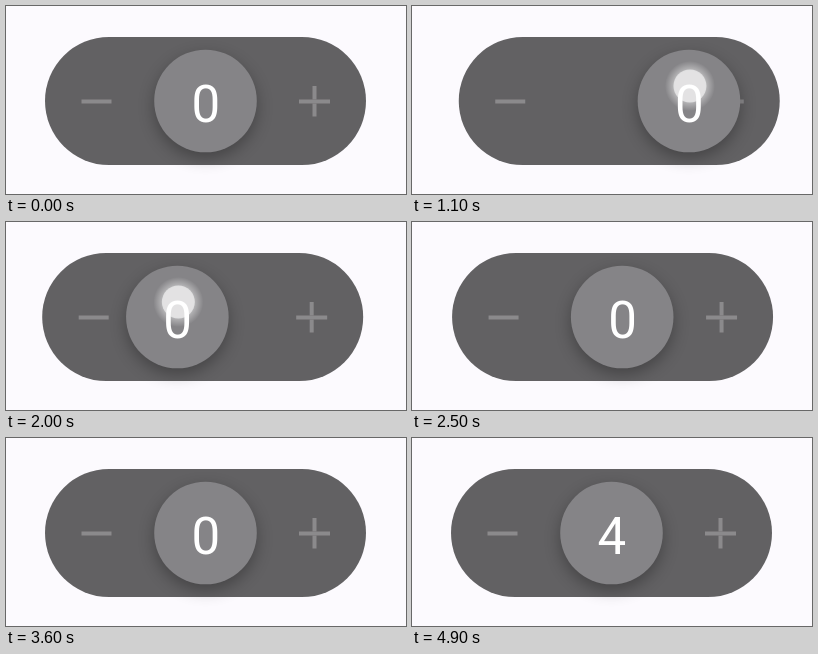
Recreate the animation shown at these times as an HTML page with a canvas. Size 400 px wide and 188 px high, loop 5000 ms.

```html
<!DOCTYPE html>
<html lang="en">
<head>
<meta charset="utf-8">
<title>Stepper</title>
<style>
  html, body { margin: 0; width: 100%; height: 100%; overflow: hidden; background: #fcfafe; }
  canvas { display: block; width: 100vw; height: 100vh; }
</style>
</head>
<body>
<canvas id="stage" width="400" height="188"></canvas>
<script>
const ctx = document.getElementById('stage').getContext('2d');
const LOOP = 5000, STEP = 50;
const CX = 199.5, CY = 95, KNOB_R = 51.3;

// Each drag pulls the knob sideways, then a spring brings it home.
const drags = [
  { grab: 160, release: 535, reach: 90 },
  { grab: 860, release: 1180, reach: 82 },
  { grab: 1790, release: 2300, reach: -67 },
  { grab: 2680, release: 3057, reach: -64 }
];
const tap = { start: 3820, release: 4200, end: 4370, x: 197.5, y: 79 };
const counts = [
  { at: -1000, text: '0' },
  { at: 3880, text: '1' },
  { at: 3990, text: '2' },
  { at: 4390, text: '3' },
  { at: 4650, text: '4' }
];

const clamp = v => Math.min(1, Math.max(0, v));
const smooth = v => v * v * (3 - 2 * v);
const easeOut = v => 1 - (1 - v) ** 3;

function spring(ms) {
  const s = ms / 1000;
  return Math.exp(-8.7 * s) * (Math.cos(15 * s) + 0.58 * Math.sin(15 * s));
}

function knobOffset(t) {
  let x = 0;
  for (const d of drags) {
    if (t < d.grab) break;
    if (t >= d.release) x = d.reach * spring(t - d.release);
    else x += (d.reach - x) * smooth(clamp((t - d.grab) / (d.release - d.grab - 40)));
  }
  return Math.abs(x) < 0.4 ? 0 : x;
}

function disc(x, y, r, color) {
  ctx.fillStyle = color;
  ctx.beginPath();
  ctx.arc(x, y, r, 0, Math.PI * 2);
  ctx.fill();
}

function drawTrack(shift) {
  ctx.save();
  ctx.translate(shift, 0);
  ctx.fillStyle = '#626163';
  ctx.beginPath();
  ctx.roundRect(39, 31, 321, 128, 64);
  ctx.fill();
  ctx.fillStyle = '#8b8a8c';
  ctx.fillRect(75.5, 93.5, 30, 4);
  ctx.fillRect(293, 93.5, 31, 4);
  ctx.fillRect(306.5, 80, 4, 13.5);
  ctx.fillRect(306.5, 97.5, 4, 13);
  ctx.restore();
}

function drawKnob(x) {
  ctx.save();
  ctx.shadowColor = 'rgba(0,0,0,.3)';
  ctx.shadowBlur = 16;
  ctx.shadowOffsetY = 6;
  disc(x, CY, KNOB_R, '#858487');
  ctx.restore();
}

function drawCount(t, x) {
  const current = counts.filter(c => c.at <= t).pop();
  const p = clamp((t - current.at) / 200);
  const scale = 1.9 - 0.9 * easeOut(p);
  ctx.save();
  ctx.globalAlpha = clamp(p * 1.5);
  ctx.translate(x + 0.3, 97.5);
  ctx.scale(scale, scale);
  ctx.font = '400 51px Roboto, sans-serif';
  ctx.textAlign = 'center';
  ctx.fillStyle = '#fff';
  ctx.fillText(current.text, 0, 18);
  ctx.restore();
}

function drawRipple(t) {
  if (t < tap.start || t >= tap.end) return;
  const grow = clamp((t - tap.start) / 330);
  ctx.save();
  ctx.beginPath();
  ctx.arc(CX, CY, KNOB_R, 0, Math.PI * 2);
  ctx.clip();
  ctx.globalAlpha = 0.2 * clamp((tap.end - t) / (tap.end - tap.release));
  disc(tap.x + 1, 80, 53 * grow, '#000');
  ctx.restore();
}

function drawTouch(x, y, alpha, glow) {
  if (alpha <= 0) return;
  ctx.save();
  ctx.globalAlpha = alpha;
  if (glow) {
    const g = ctx.createRadialGradient(x, y, 15, x, y, 25);
    g.addColorStop(0, 'rgba(255,255,255,.45)');
    g.addColorStop(1, 'rgba(255,255,255,0)');
    disc(x, y, 25, g);
  }
  disc(x, y, 16.5, 'rgba(255,255,255,.58)');
  ctx.restore();
}

function touchAlpha(t, start, release) {
  return clamp((t - start) / 60) * clamp(1 - (t - release) / 150);
}

function draw(t) {
  const offset = knobOffset(t);
  ctx.fillStyle = '#fcfafe';
  ctx.fillRect(0, 0, 400, 188);
  drawTrack(offset * 0.1);
  drawKnob(CX + offset);
  drawCount(t, CX + offset);
  drawRipple(t);
  for (const d of drags) {
    const x = CX + 1 + (t < d.release ? offset : d.reach);
    drawTouch(x, 80, touchAlpha(t, d.grab, d.release), t < d.release);
  }
  drawTouch(tap.x, tap.y, touchAlpha(t, tap.start, tap.release), true);
}

const began = performance.now();
function tick() {
  const t = (performance.now() - began) % LOOP;
  draw(Math.floor(t / STEP) * STEP);
  requestAnimationFrame(tick);
}
tick();
</script>
</body>
</html>
```
